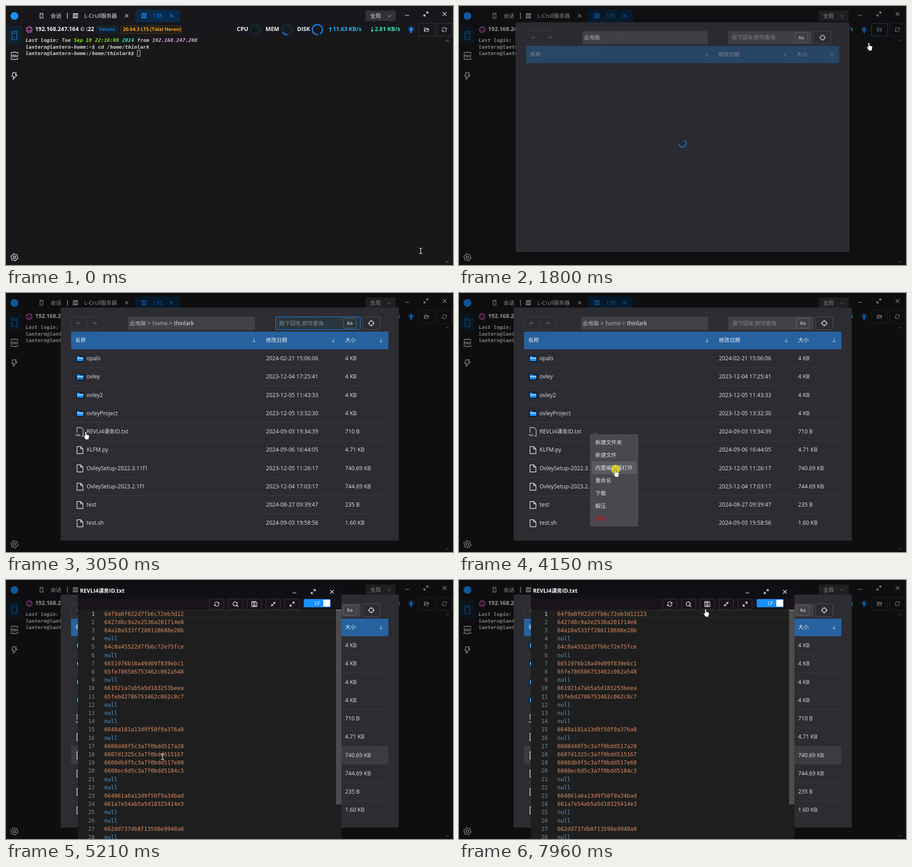
An HTML page that plays this animation: 982 px wide and 570 px high, repeating every 8000 ms.

```html
<!DOCTYPE html>
<html lang="zh">
<head>
<meta charset="utf-8">
<title>Terminal session</title>
<style>
html, body { margin: 0; width: 100%; height: 100%; overflow: hidden; background: #18181c; }
svg { display: block; width: 100vw; height: 100vh; }
text { font-family: "Open Sans", "Noto Sans CJK SC", "Noto Sans CJK", sans-serif; white-space: pre; }
.mono { font-family: "DejaVu Sans Mono", monospace; }
.term { font: italic bold 11px "DejaVu Sans Mono", monospace; }
</style>
</head>
<body>
<svg id="stage" viewBox="0 0 982 570"></svg>
<script>
const LOOP = 8000, BLUE = '#1890ff', LIGHT = '#e2e2e3';

// Markup helpers; text is placed by its vertical centre.
const text = (x, cy, s, size = 12.2, fill = LIGHT, extra = '') =>
  `<text x="${x}" y="${cy + size * .36}" font-size="${size}" fill="${fill}" ${extra}>${s}</text>`;
const bold = (x, cy, s, size = 12.4, fill = '#f4f4f4') => text(x, cy, s, size, fill, 'font-weight="700"');
const rect = (x, y, w, h, fill, extra = '') =>
  `<rect x="${x}" y="${y}" width="${w}" height="${h}" fill="${fill}" ${extra}/>`;
const box = (x, y, w, h, stroke, fill = 'none', r = 2) => rect(x, y, w, h, fill, `rx="${r}" stroke="${stroke}"`);
const line = (d, stroke = LIGHT, w = 1.2, fill = 'none') =>
  `<path d="${d}" fill="${fill}" stroke="${stroke}" stroke-width="${w}" stroke-linejoin="round"/>`;
const group = (id, inner, extra = '') => `<g id="${id}" ${extra}>${inner}</g>`;
const ring = (x, y, r, stroke, w, from, share) =>
  `<circle cx="${x}" cy="${y}" r="${r}" fill="none" stroke="${stroke}" stroke-width="${w}" pathLength="100"
    stroke-dasharray="${share} 100" transform="rotate(${from} ${x} ${y})"/>`;

// Icons
const cross = (x, y, r, c) => line(`M${x - r} ${y - r}l${2 * r} ${2 * r}m0 ${-2 * r}l${-2 * r} ${2 * r}`, c);
const expand = (x, y, c = LIGHT) =>
  line(`M${x + 1} ${y - 1}l3.500-3.500m-4 0h4v4M${x - 1} ${y + 1}l-3.500 3.500m4 0h-4v-4`, c, 1.4);
const shrink = (x, y) => line(`M${x + 5} ${y - 5}l-4 4m0-3.5v3.5h3.5M${x - 5} ${y + 5}l4-4m-3.5 0h3.5v3.5`, LIGHT, 1.4);
const cycle = (x, y, w) => ring(x, y, 4.8, LIGHT, w, 195, 38) + ring(x, y, 4.8, LIGHT, w, 15, 38) +
  line(`M${x + 4.8} ${y - 4}v3h-3M${x - 4.8} ${y + 4}v-3h3`, LIGHT, w);
const device = (x, y, h, c) => line(`M${x - h * .3} ${y - h / 2}h${h * .6}v${h}h${-h * .6}z
  M${x - h * .14} ${y - h * .28}h${h * .28}M${x - 1} ${y + h * .25}h2`, c, 1.2);
const map = (x, y, c) => line(`M${x - 4.8} ${y - 4}l3.2-1 3.200 1 3.200-1v9l-3.200 1-3.200-1-3.200 1zm3.200-1v9m3.200-8v9`, c, 1.5);
const openFolder = c => line('M919 56v-8h3.5l1.2 1.6h4.3v2M919 56l2-4.4h8l-2 4.4z', c, 1.1);
const target = (x, y) => line(`M${x - 5} ${y}a5 5 0 1 0 10 0a5 5 0 1 0-10 0M${x} ${y - 7}v4m0 6v4M${x - 7} ${y}h4m6 0h4`, LIGHT, 1.3);
const down = (x, y) => line(`M${x} ${y - 4.5}v9m-3.5-3.5l3.5 3.5 3.5-3.5`, '#c3d3e4', 1);
const folder = y => line(`M155 ${y - 6.5}h6l1.5 2h8v11h-15.5z`, '#05080c', 1.4, BLUE) +
  line(`M156 ${y - .5}h14`, '#e8f3ff', 1.6);
const page = y => line(`M156 ${y - 7.5}h8l5 5v10.500h-13zm8 0v5h5`, LIGHT, 1.4);
const txtPage = y => line(`M156 ${y + 2}v-11h9l4.500 4.500v14h-4`, LIGHT, 1.2) +
  text(153, y + 8, 'TXT', 5.6, LIGHT, 'font-weight="700"');

function gear(x, y) {
  let d = '';
  for (let i = 0; i < 24; i++) {
    const a = (i + .5) * Math.PI / 12, r = i % 4 < 2 ? 8 : 6.4;
    d += `${i ? 'L' : 'M'}${x + r * Math.cos(a)} ${y + r * Math.sin(a)}`;
  }
  return line(d + 'z', LIGHT, 1.4) + `<circle cx="${x}" cy="${y}" r="2.7" fill="none" stroke="${LIGHT}" stroke-width="1.4"/>`;
}

function bulb(x, y) {
  let rays = '';
  for (let i = 0; i < 7; i++) {
    const a = (150 + i * 40) * Math.PI / 180, c = Math.cos(a), s = Math.sin(a);
    rays += `M${x + 5 * c} ${y - 1 + 5 * s}L${x + 7 * c} ${y - 1 + 7 * s}`;
  }
  return line(rays, BLUE, 1.2) + `<circle cx="${x}" cy="${y - 1}" r="3.8" fill="${BLUE}"/>` +
    rect(x - 2, y + 2, 4, 5, BLUE);
}

function topBar() {
  return `<circle cx="18.500" cy="22" r="8.500" fill="${BLUE}"/>` +
    device(78, 21.5, 11, LIGHT) + text(98, 21.5, '会话', 11.7) + rect(134.3, 15, 1.4, 13, LIGHT) +
    map(152.5, 21.5, LIGHT) + text(172, 21.5, 'L-Crull<tspan font-size="11.7">服务器</tspan>') + cross(265, 21.5, 3.6, LIGHT) +
    '<path d="M281 36q3-1 3-5V15q0-7 7-7h84q7 0 7 7v16q0 4 3 5z" fill="#092a4a"/>' +
    map(303, 21.5, BLUE) + text(323, 21.5, '135', 12.2, BLUE) + cross(363.5, 21.5, 3.6, BLUE) +
    rect(790, 10, 66, 23, '#333337', 'rx="2"') + text(800, 21.5, '全局', 11.7) + line('M838 20l4 4 4-4', '#8b8b8e', 1.1) +
    line('M876.500 20.500h9') + expand(922.5, 17.5) + cross(963.5, 17.5, 4, LIGHT);
}

function sideBar() {
  return rect(2, 45, 33, 39, '#11222f') + device(18.5, 65, 18, BLUE) +
    text(18.5, 110, 'ENV', 8.4, LIGHT, 'font-weight="700" text-anchor="middle"') +
    line('M11 105v-2.500h4l3.500-1.500 3.500 1.500h4v2.500M11 114.500v2.500h4l3.500 1.500 3.500-1.500h4v-2.500', LIGHT, 1.4) +
    line('M15 147h7.500l-2 5h4l-9 9.500 1.500-6.500h-4z', LIGHT, 1.5) + gear(18.5, 553);
}

function statusRow() {
  const pink = '#e864d8', up = '#18b8ff', lo = '#3fdfb4';
  const dial = (x, share) => ring(x, 52, 11, '#132a3a', 3, 0, 100) + ring(x, 52, 11, '#1078e0', 3, 85, share);
  return `<circle cx="51" cy="52" r="6.300" fill="none" stroke="${pink}" stroke-width="1.500"/>` +
    line('M46.500 49.500q1.500-1 3 0m3 0q1.500-1 3 0M47.500 53q3.500 4 7 0', pink, 1.4) +
    bold(64, 51, '192.168.247.164') + line('M165 48v5.500h1.500M166.500 46.500h3l1.500 1.500v6h-4.500z', LIGHT, 1) + bold(176, 51, ':22') +
    box(198.5, 43.5, 48, 17, '#12263a', '#151f29') + bold(204, 51.5, 'Velunt', 11, '#1272d4') +
    box(252.5, 43.5, 133, 17, '#55400f', '#1f1b15') + bold(257, 51.5, '20.04.3 LTS (Tidal Heron)', 10.6, '#f7a81f') +
    bold(507, 51, 'CPU') + dial(548, 0) + bold(570, 51, 'MEM') + dial(617.5, 18) +
    bold(639.5, 51, 'DISK') + dial(684, 92) +
    line('M712.500 57v-10m-2.500 3l2.500-3 2.500 3', up, 1.5) + `<g id="upRate">${bold(718, 51, '', 12.4, up)}</g>` +
    line('M804.500 46v10m-2.500-3l2.500 3 2.500-3', lo, 1.5) + `<g id="downRate">${bold(810, 51, '', 12.4, lo)}</g>` +
    bulb(890, 52) +
    box(906.5, 38.5, 35, 28, '#3c3c40') + openFolder(LIGHT) +
    box(946, 38.5, 34, 28, '#3c3c40') + cycle(963, 52, 1) +
    group('folderHover', box(906.5, 38.5, 35, 28, BLUE, '#18181c') + openFolder(BLUE));
}

function terminal() {
  const row = (i, s) => `<text class="term" x="43" y="${79.3 + 14.3 * i}" fill="#d2d2d2">${s}</text>`;
  const tint = (c, s) => `<tspan fill="${c}">${s}</tspan>`;
  const user = 'lantern@lantern-home:';
  return rect(38, 68, 944, 502, '#181818') +
    row(0, `Last login: Tue ${tint('#7ee80c', 'Sep 10 22:16:08')} ${tint('#3adcc4', '2024')} from ${tint('#dca6e8', '192.168.247.208')}`) +
    row(1, user + '~$ cd /home/thinlark') + row(2, user + '/home/thinlark$') +
    group('block', box(288.5, 97.5, 6, 13, '#e4e4e4', 'none', 0)) +
    '<path d="M965 77.500l4.500-4.500 4.500 4.500zM965 561.500l4.500 4.500 4.500-4.500z" fill="#4b4b4b"/>';
}

const FILES = [
  ['opals', '2024-02-21 15:06:06', '4 KB'],
  ['ovley', '2023-12-04 17:25:41', '4 KB'],
  ['ovley2', '2023-12-05 11:43:33', '4 KB'],
  ['ovleyProject', '2023-12-05 13:32:30', '4 KB'],
  ['REVLI4<tspan font-size="11.7">课务</tspan>ID.txt', '2024-09-03 19:34:39', '710 B'],
  ['KLFM.py', '2024-09-06 16:44:05', '4.71 KB'],
  ['OvleySetup-2022.3.11f1', '2023-12-05 11:26:17', '740.69 KB'],
  ['OvleySetup-2023.2.1f1', '2023-12-04 17:03:17', '744.69 KB'],
  ['test', '2024-08-27 09:39:47', '235 B'],
  ['test.sh', '2024-09-03 19:58:56', '1.60 KB']
];

function fileRow([name, date, size], i) {
  const y = 143.7 + 40.25 * i, icon = i < 4 ? folder : i === 4 ? txtPage : page;
  return (i < 9 ? rect(143, y + 20, 697, 1, '#3a3a40') : '') + icon(y + .5) +
    text(177, y, name) + text(571, y, date) + text(745, y, size);
}

function dialog() {
  const back = c => line(`M${c + 4} 66.500h-8m3-3l-3 3 3 3`, '#77777b', 1);
  const next = c => line(`M${c - 4} 66.500h8m-3-3l3 3-3 3`, '#77777b', 1);
  const soft = '#b9b9bc', field = '#414147';
  const table = rect(143, 85, 697, 38.7, '#26629f') +
    text(152, 104, '名称', 11.7, '#f2f2f2') + text(571, 104, '修改日期', 11.7, '#f2f2f2') + text(745, 104, '大小', 11.7, '#f2f2f2') +
    down(545, 104) + down(719, 104) + down(824, 104) +
    group('rowHover', rect(143, 365.5, 697, 40, '#3b3b41')) + group('rows', FILES.map(fileRow).join(''));
  return rect(120, 32, 743, 513, '#2c2c32', 'rx="3"') +
    box(143, 52.5, 69, 28, '#3f3f45') + rect(177, 52.5, 1, 28, '#3f3f45') + back(160) + next(195) +
    rect(268, 52, 279, 29, field, 'rx="2"') + text(272, 66.7, '此电脑', 11.7, soft) +
    group('path', text(311, 67, '&gt;', 12.2, soft) + text(322, 67, 'home', 12.2, soft) +
      text(358, 67, '&gt;', 12.2, soft) + text(369, 67, 'thinlark', 12.2, '#f2f2f2')) +
    rect(592, 52, 187, 29, field, 'rx="2"') +
    group('focus', box(592.5, 52.5, 186, 28, BLUE, '#2a363f') + rect(601, 60, 1, 13, BLUE)) +
    text(601, 66.5, '按下回车,即可查询', 11.7, '#8a8a8e') +
    box(741.5, 55.5, 28, 22, '#66666b') + text(749, 66.5, 'Aa', 10.5) +
    box(783.5, 52.5, 38, 28, '#515157') + target(802.5, 66.5) +
    group('table', table) + group('spinner', ring(0, 0, 10.5, '#2478cc', 3, 0, 66));
}

const MENU = ['新建文件夹', '新建文件', '内置编辑器打开', '重命名', '下载', '解压', '删除'];
const menu = () => '<path d="M294 311l5.500-5 5.500 5z" fill="#48484e"/>' +
  rect(288, 311, 106, 203, '#48484e', 'rx="2"') +
  `<rect id="menuHover" x="292" width="99" height="28" rx="2" fill="#5a5a60"/>` +
  MENU.map((s, i) => text(299.5, 328.3 + 28.1 * i, s, 11.7, i === 6 ? '#d01414' : LIGHT)).join('');

const HEX = `64f9a0f022d7fb6c72eb3d12 6427d8c9a2e2536a201714e8 64a10a533ff280110688e28b null
64c8a45522d7fb6c72e75fce null 6651976b18a49d09f839ebc1 65fe786586753462c062a548 null
661921a7ab5a5d183253beea 65febd2786753462c062c8c7 null null null 6648a181a13d9f50f9a376a8 null
6608d40f5c3a7f0bdd517a28 6607d1325c3a7f0bdd515167 6608db9f5c3a7f0bdd517e60 6608ec6d5c3a7f0bdd5184c3
null null 664861a6a13d9f50f9a34bad 661a7e54ab5a5d18325414e3 null null 662dd737db8f13598e9948a0 null`.split(/\s+/);
const CHAR = 7.27;

function codeLine(s, i) {
  const y = 78.6 + 18.2 * i, font = 'class="mono" font-size="12.080"';
  return `<text ${font} x="195" y="${y}" text-anchor="end" fill="${i ? '#858585' : '#d0d0d0'}">${i + 1}</text>` +
    `<text ${font} x="216" y="${y}" fill="${s === 'null' ? '#569cd6' : '#d98a5f'}" ${i ? '' : 'id="firstLine"'}>${s}</text>`;
}

function editor() {
  const centres = [463, 504.5, 545.5, 587, 628.5];
  const chrome = rect(158, 41, 579, 25, '#19141a') +
    bold(162.5, 24, 'REVLI4<tspan font-size="11.7">课务</tspan>ID.txt', 12.2) +
    line('M629.500 28.500h8') + expand(675, 25.5) + cross(716, 26, 4, '#f4f4f4') +
    centres.map(x => box(x - 15.5, 41.5, 31, 23.5, '#3e3a40')).join('') +
    cycle(463, 53, 1.4) + line('M499 52.500a4.500 4.500 0 1 0 9 0a4.500 4.500 0 1 0-9 0m7.700 3.200l3.500 3.500', LIGHT, 1.6) +
    line('M540 47.500h9l2 2v9h-11zm2.500 0v3h5v-3M543.500 55.500a2 2 0 1 0 4 0a2 2 0 1 0-4 0', LIGHT, 1.4) +
    shrink(587, 53) + expand(628.5, 53) +
    rect(654, 42, 59, 18, BLUE, 'rx="2"') + text(678, 51, 'LF', 11.5, '#fff') + rect(697, 43.5, 15, 15, '#fff', 'rx="2"');
  const code = rect(158, 66, 579, 504, '#1e1e1e') + line('M216 66.500h509M216 82h509', '#2c2c2c', 1.5) +
    HEX.map(codeLine).join('') + rect(725, 66, 12, 428, '#4c4c4c') + rect(725, 65.500, 12, 1.5, '#9c9c9c') +
    '<rect id="caret" y="66" width="1.500" height="16" fill="#dcdcdc"/>';
  return rect(158, 10, 579, 570, '#101014') + group('chrome', chrome) + group('code', code);
}

const pointer = () => `<circle id="click" r="10" fill="#e6dc1e" opacity=".8"/>` +
  group('ibeam', line('M-3.500-6q2.500 0 3.500 1 1-1 3.500-1M0-5v10M-3.500 6q2.500 0 3.500-1 1 1 3.500 1', '#f0f0f0', 1.2)) +
  group('arrow', line('M0 0v13l3-2.800 2 4.600 2.300-1-2-4.400h4z', '#222', .8, '#fff')) +
  group('hand', line(`M-1.700 1.400q0-1.600 1.500-1.600t1.500 1.600v4.600l4.500 1q2 .5 1.700 2.500l-.8 4.500-.7 3h-6.500l-4-6.500
    q-.7-1.500.5-2t2.300 1.500z`, '#222', .8, '#fff'));

const stage = document.getElementById('stage');
stage.innerHTML = rect(0, 0, 982, 570, '#18181c') + terminal() + topBar() + sideBar() + statusRow() +
  rect(0, 0, 982, 570, '#000', 'id="mask"') + group('dialog', dialog()) + group('menu', menu()) +
  group('editor', editor()) + group('pointer', pointer());

const el = {};
stage.querySelectorAll('[id]').forEach(e => el[e.id] = e);
const [upText, downText] = [el.upRate, el.downRate].map(g => g.firstChild);

const clamp = v => Math.max(0, Math.min(1, v));
const ramp = (t, a, b) => clamp((t - a) / (b - a));
const easeOut = p => 1 - (1 - p) ** 3;
const smooth = p => p * p * (3 - 2 * p);
const fade = (name, v) => el[name].setAttribute('opacity', v);
const show = (name, on) => el[name].setAttribute('visibility', on ? 'inherit' : 'hidden');
const grow = (name, p, x, y) => {
  const s = .5 + .5 * p;
  el[name].setAttribute('transform', `translate(${x * (1 - s)} ${y * (1 - s)}) scale(${s})`);
  fade(name, p);
};

// Pointer stops: time, x, y
const STOPS = [[70, 911, 539], [830, 930, 60], [960, 930, 56], [1690, 930, 56], [2080, 781, 184], [2180, 775, 190],
  [2910, 215, 300], [3080, 172, 306], [3380, 288, 303], [3500, 288, 303], [3880, 344, 388], [5620, 344, 389],
  [6130, 431, 348], [6210, 431, 348], [6380, 424, 120], [6450, 419, 119], [6640, 400, 74], [7400, 400, 74], [7930, 542, 64], [8000, 542, 64]];

function mouseAt(t) {
  const i = STOPS.findIndex(s => s[0] > t);
  if (i <= 0) return STOPS[i < 0 ? STOPS.length - 1 : 0].slice(1);
  const [a, x, y] = STOPS[i - 1], [b, u, v] = STOPS[i], p = smooth(ramp(t, a, b));
  return [x + (u - x) * p, y + (v - y) * p];
}

function cursorAt(t, x) {
  if (t < 790) return 'ibeam';
  if (t < 1630) return 'hand';
  if (t < 1760) return 'arrow';
  if (t < 4840) return 'hand';
  if (t < 5200) return 'arrow';
  if (t < 7480) return 'ibeam';
  return x > 529 ? 'hand' : 'arrow';
}

function render(t) {
  const [x, y] = mouseAt(t), kind = cursorAt(t, x);
  el.pointer.setAttribute('transform', `translate(${x} ${y})`);
  ['ibeam', 'arrow', 'hand'].forEach(k => show(k, k === kind));
  show('click', [1500, 4110, 6640].some(c => t >= c && t < c + 110));

  const late = t >= 1450;
  upText.textContent = late ? '7.19 KB/s' : '11.63 KB/s';
  downText.textContent = late ? '1.90 KB/s' : '2.81 KB/s';
  show('block', t < 400 || t >= 1000);
  fade('folderHover', ramp(t, 880, 1060) * (1 - ramp(t, 1720, 1920)));

  const open = easeOut(ramp(t, 1625, 1875));
  fade('mask', .4 * open);
  grow('dialog', open, 491.3, 288);
  const loaded = t >= 1900;
  show('rows', loaded);
  show('path', loaded);
  show('focus', t >= 1880 && t < 3440);
  const ready = ramp(t, 2300, 2550);
  fade('table', .5 + .5 * ready);
  fade('spinner', 1 - ready);
  el.spinner.setAttribute('transform',
    `translate(491 303) rotate(${10 + (t - 2080) * .27}) scale(${ramp(t, 1645, 1850)})`);
  fade('rowHover', ramp(t, 4880, 5180));

  grow('menu', easeOut(ramp(t, 3450, 3600)) * (1 - ramp(t, 4230, 4380)), 299, 306);
  const item = Math.floor((y - 314.3) / 28.1);
  show('menuHover', x > 291 && item >= 0);
  el.menuHover.setAttribute('y', 314.3 + 28.1 * item);

  grow('editor', easeOut(ramp(t, 4790, 4930)), 447, 290);
  show('chrome', t >= 5010);
  show('code', t >= 5210);
  const typed = [7080, 7190, 7300].filter(k => t >= k).length;
  el.firstLine.textContent = HEX[0] + '123'.slice(0, typed);
  el.caret.setAttribute('x', 216 + CHAR * (24 + typed));
  el.caret.setAttribute('opacity', t >= 6660 && t < 7800 ? 1 : 0);
}

const start = performance.now();
function tick() {
  render((performance.now() - start) % LOOP);
  requestAnimationFrame(tick);
}
tick();
</script>
</body>
</html>
```
